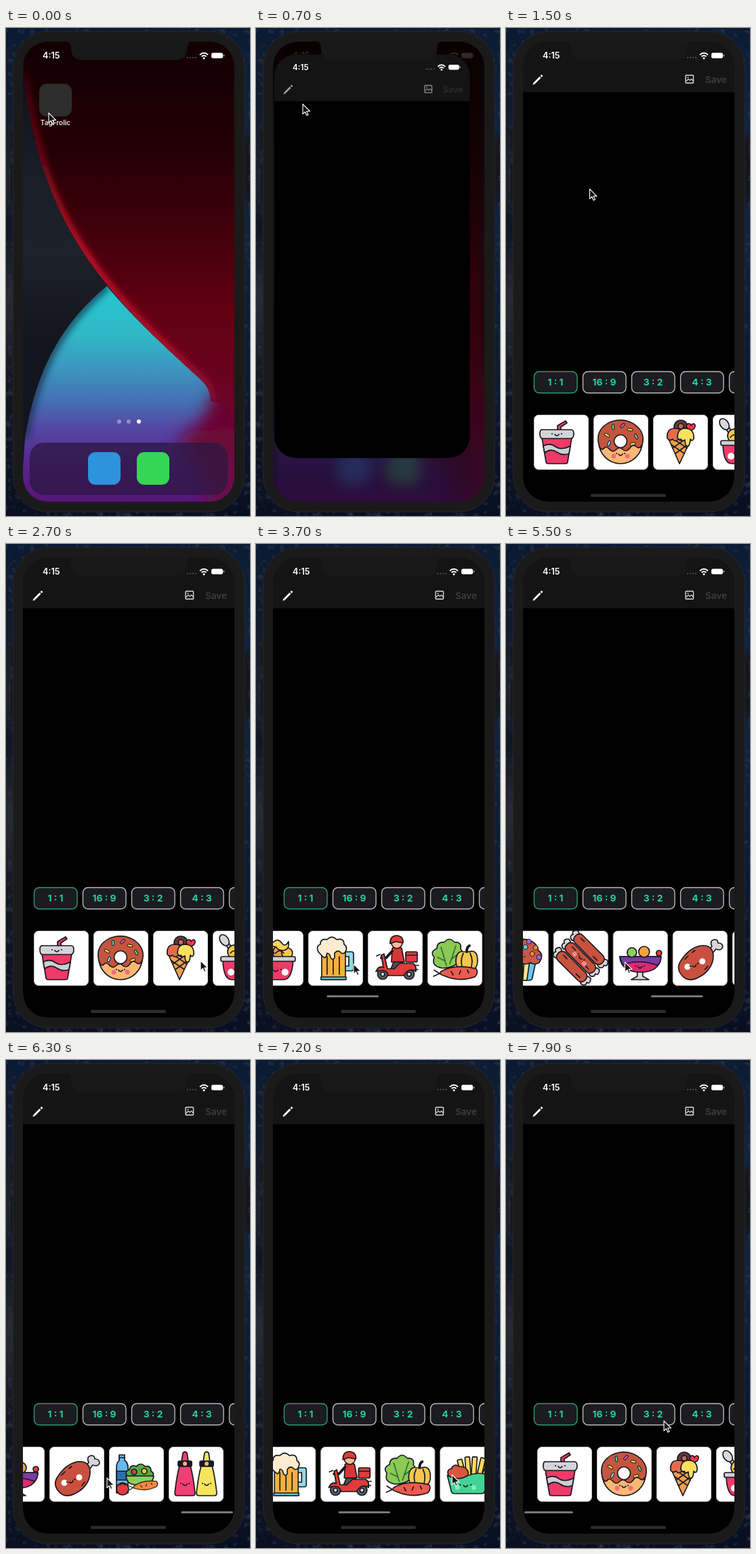
An HTML page that plays this animation: 360x718 px, repeating every 8 s.

```html
<!DOCTYPE html>
<html lang="en">
<head>
<meta charset="utf-8">
<title>Sticker picker</title>
<style>
html, body { margin: 0; width: 100%; height: 100%; overflow: hidden; background: #081226; }
svg { display: block; width: 360px; height: 718px; }
text { font-family: Inter, Roboto, sans-serif; font-weight: 600; }
.art { stroke: #191820; stroke-width: 1.7; stroke-linejoin: round; stroke-linecap: round; }
</style>
</head>
<body>
<svg id="stage" viewBox="0 0 360 718"></svg>
<script>
const LOOP = 8000, PITCH = 88, MAX_SCROLL = 945;
const path = (d, fill = 'none', more = '') => `<path d="${d}" fill="${fill}" ${more}/>`;
const disc = (x, y, r, fill, more = '') => `<circle cx="${x}" cy="${y}" r="${r}" fill="${fill}" ${more}/>`;
const box = (x, y, w, h, r, fill, more = '') =>
  `<rect x="${x}" y="${y}" width="${w}" height="${h}" rx="${r}" fill="${fill}" ${more}/>`;
const text = (x, y, size, fill, str, more = '') =>
  `<text x="${x}" y="${y}" font-size="${size}" fill="${fill}" ${more}>${str}</text>`;
const line = (d, color, width) => path(d, 'none', `stroke="${color}" style="stroke-width:${width}"`);
const flat = 'stroke="none" style="stroke:none"';
const turn = (angle, x, y, inner) => `<g transform="rotate(${angle} ${x} ${y})">${inner}</g>`;
const ramp = (id, stops) =>
  `<linearGradient id="${id}" gradientUnits="userSpaceOnUse" x1="0" y1="0" x2="0" y2="718">` +
  stops.map(([y, c]) => `<stop offset="${y / 718}" stop-color="${c}"/>`).join('') + '</linearGradient>';

const face = (x, y, gap = 7, cheek = 'none') =>
  disc(x - gap - 4, y + 4, 3.4, cheek, flat) + disc(x + gap + 4, y + 4, 3.4, cheek, flat) +
  disc(x - gap, y, 1.1, '#191820', flat) + disc(x + gap, y, 1.1, '#191820', flat) +
  path(`M${x - 3} ${y + 1}q3 4 6 0`);
const beads = (spots, r) => {
  const colors = ['#f9dc4a', '#ee5aa0', '#64c7e8', '#a06be0', '#f58a3c'];
  return spots.map(([x, y], i) => disc(x, y, r, colors[i % 5], 'style="stroke-width:1"')).join('');
};
const carrot = (color) =>
  path('M72 56Q40 48 20 60Q16 64 24 66Q46 76 70 68Q76 62 72 56Z', color) +
  path('M18 63l-8-5m8 5l-9 4m26-7l3 5m11-6l-2 5m12-6l2 4');
const bottle = (x, color) =>
  path(`M${x + 10} 22L${x + 12} 9q3-3 6 0L${x + 20} 22Z`, color) +
  path(`M${x + 7} 28Q${x + 3} 42 ${x} 68q0 4 4 4h22q4 0 4-4Q${x + 27} 42 ${x + 23} 28Z`, color) +
  box(x + 5, 21, 20, 8, 2, '#191820') + disc(x + 15, 25, 3, '#f2b48a', flat) + face(x + 15, 54, 6);
const rib = (y) =>
  path(`M15 ${y - 5}q-7-5-9 0-3 5 2 6-3 4 2 7 4 1 6-2Zm50 0q7-5 9 0 3 5-2 6 3 4-2 7-4 1-6-2Z`, '#d9d6d6') +
  box(12, y - 8, 56, 16, 7, '#c9523f') + path(`M20 ${y - 3}h7m25 6h8`);

const stickers = [
  // soda
  path('M35 23V16L47 9l2 3-9 6v5Z', '#ee3a68') +
  path('M12 34L18 69q0 3 4 3h24q4 0 4-3L56 34Z', '#ee3a68') +
  path('M14 46q10-5 18 1t22-1l-2 11q-9 4-18-2t-18 1Z', '#cbd0d4') +
  path('M13 22h42q4 0 4 6t-4 7H13q-4 0-4-7t4-6Z', '#d2d4d7') + face(34, 28),
  // donut
  disc(40, 40, 32, '#fbb873') +
  path('M8 44C2 20 22 8 40 8s38 14 32 36q-4 8-10 2-5-3-9 4-5 6-11 0-4-3-8 1-6 6-11-1-5-5-8 0-5 3-7-6Z', '#c4553f') +
  disc(40, 39, 9.5, '#fff') +
  [[20, 30, '#f9dc4a'], [29, 18, '#63cf93'], [43, 16, '#ee5aa0'], [54, 22, '#f9dc4a'], [63, 32, '#63cf93'], [23, 42, '#8fd5f4'], [58, 43, '#f9dc4a']]
    .map(([x, y, c], i) => turn(i * 53 + 30, x, y, box(x - 4, y - 1.7, 8, 3.4, 1.7, c, 'style="stroke-width:1"'))).join('') +
  face(40, 57, 6, '#f56b79'),
  // ice cream
  disc(41, 18, 10, '#633b3a') + disc(41, 17, 4, '#c46a58') +
  path('M54 24q-9-8-2-11 4 0 4 3 3-5 6-1 1 6-8 9Z', '#ef3b4d') +
  path('M23 36L39 72 56 36Z', '#f0a050') + path('M27 44l19 13M32 37l18 12M51 44L33 57M46 37L29 49') +
  path('M21 35q-2-15 12-15 13 1 12 15-4 5-8 1-4 5-8 0-4 3-8-1Z', '#e56c4a') +
  path('M36 33q0-13 12-13 13 1 12 15-2 5-5 1-1 12-5 10-3-1-3-9-4 3-6-1-3 2-5-3Z', '#fbe05c'),
  // noodle bowl
  turn(-35, 20, 18, path('M18 20h5l1 22h-7Z', '#c5cacf') + '<ellipse cx="20" cy="13" rx="6" ry="9" fill="#d7dadd"/>') +
  disc(32, 31, 10, '#f9c74f') + disc(46, 32, 10, '#f09a4c') + disc(57, 33, 8, '#f9c74f') +
  path('M32 22q10-14 17-4 5 7 10-2 2 12-8 13-8 0-10-5Z', '#fbd45c') + path('M40 33q6-7 12 0M26 33q6-7 12 0') +
  path('M15 44Q16 72 28 72H52Q64 72 66 44Z', '#ee3a68') + box(12, 38, 57, 7, 2, '#cbd0d4') +
  disc(27, 61, 5, '#fff', flat) + disc(54, 61, 5, '#fff', flat) + face(40, 57, 8),
  // mug
  path('M54 31h10q3 0 3 3v21q0 4-3 4H54v-7h6V38h-6Z', '#8fdce8') +
  box(20, 26, 35, 46, 3, '#f6b040') + path('M28 38v26m9-26v26m9-26v26') +
  path('M19 68h37v4H19Z', '#5cc8c4') +
  path('M15 31q-4-8 3-11 0-9 10-7 7-7 14 0 11-3 11 7 6 4 2 11-4 5-8 0-4-3-8 2v7q-4 4-6-1-1-6-5-6-2 10-6 5-3-2-7-7Z', '#fbecd0'),
  // delivery scooter
  disc(22, 64, 7.5, '#5b5f68') + disc(61, 64, 7.5, '#5b5f68') + disc(22, 64, 3, '#d7dadd') + disc(61, 64, 3, '#d7dadd') +
  box(56, 31, 17, 15, 2, '#e23b3b') + path('M56 36h17') +
  path('M36 26q8-5 14 0l4 20H35Z', '#d83636') + path('M36 30l-9 10h-7', 'none', 'style="stroke-width:4"') +
  path('M38 46h14l-3 8-12 9h-7l5-9Z', '#4b4f59') +
  path('M12 60q4-9 11-6l-3-18 4-2 5 22h10l8-8h20q5 4 4 12-10-7-18 6H30q-1-11-18-6Z', '#e23b3b') +
  disc(43, 18, 8, '#f4bd94') + path('M33 18q0-11 10-11 10 1 9 11l-11-2-8 3Z', '#e23b3b') +
  path('M70 51h5m-5 6h4M18 35l-5 2'),
  // vegetables
  path('M22 55q-17-3-12-16-7-8 4-13 0-10 11-9 7-9 15 0 11-1 9 10 7 7-1 14-3 13-26 14Z', '#8cc955') +
  path('M20 24l8 27m14-29l-9 27M15 39l10 5m18-8l-8 6', 'none', 'stroke="#2b722f"') +
  path('M58 31q0-7 4-9', 'none', 'style="stroke-width:4"') +
  path('M58 32q16-7 16 12 0 16-16 14-16 2-16-14 1-18 16-12Z', '#f4c64a') + path('M53 33q-6 12 0 25m10-25q6 12 0 25') +
  carrot('#ec5a50'),
  // fries
  [[36, 18, -14], [43, 15, -4], [50, 15, 4], [58, 16, 13], [65, 22, 22]]
    .map(([x, y, a]) => turn(a, x, 45, box(x - 4, y, 7, 32, 1, '#fbd95c'))).join('') +
  path('M13 43q-4-9 4-11 4-8 12-3 11 0 13 9l-2 11H18Z', '#d9573f') +
  path('M11 42Q26 51 40 43 57 36 71 42L66 66q-1 3-5 3H22q-4 0-5-3Z', '#43d394') + face(38, 56, 8, '#8be8bd'),
  // muffin
  path('M19 46L25 70q1 3 4 3h23q4 0 5-3L62 46Z', '#6bc8ec') +
  path('M28 46l4 27h6l-2-27Zm17 0l-2 27h6l4-27Z', '#fbe58a') +
  path('M14 47q-8-11 1-18 3-17 25-17 23 1 26 17 9 7 1 18-7 4-13 0-7 4-14 0-7 4-14 0-6 4-12 0Z', '#c9594a') +
  beads([[19, 24], [29, 16], [40, 14], [52, 16], [62, 25], [14, 38], [33, 25], [47, 24], [67, 39], [57, 34], [23, 34]], 3.6) + face(40, 38, 6),
  // ribs
  turn(45, 40, 40, rib(22) + rib(40) + rib(58) + face(40, 38, 6, '#f28b85')),
  // fruit bowl
  path('M36 57h8v10l9 5H27l9-5Z', '#d7dadd') + path('M58 52L67 35', 'none', 'style="stroke-width:3"') +
  path('M10 38h61q-2 23-30 23-29 0-31-23Z', '#d92b73') + path('M10 38h61q0 9-5 13Q40 41 14 50Z', '#7a3ca4') +
  disc(68, 33, 4, '#e23b3b') + disc(28, 32, 7, '#8bcf5a') + disc(46, 31, 8, '#f7a43d') + face(40, 52, 6),
  // drumstick
  path('M50 33l8-10q-4-9 4-10 5 0 5 5 7 0 7 6-2 6-10 3L56 37Z', '#d5d7da') +
  path('M14 66Q4 55 13 43 24 26 41 22 58 20 60 35 61 52 46 64 25 79 14 66Z', '#c9503e') +
  path('M18 42l5-5m6-5l4-3m15 28l4-5') + disc(22, 53, 4.5, '#fff', flat) + disc(44, 45, 4.5, '#fff', flat) +
  turn(-20, 32, 51, face(32, 50, 6)),
  // groceries
  path('M15 12h8v8q5 4 5 10v38H11V30q0-6 4-10Z', '#66b9ea') + path('M11 36h17v13H11Z', '#2e6fa8') + path('M15 16h8') +
  path('M27 43q-5-7 3-9 2-9 10-5 7-7 13 0 9-2 9 7 6 3 2 8Z', '#55ad48') + disc(37, 37, 4, '#e23b3b') + disc(52, 36, 4, '#f7c53d') +
  path('M25 43h41q-2 13-14 13H38q-12-1-13-13Z', '#8bcf5a') +
  turn(-8, 48, 62, `<g transform="translate(24 17) scale(.66)">${carrot('#f58a3c')}</g>`) +
  disc(20, 62, 9, '#e23b3b') + path('M20 53l-4 3m4-3l4 3'),
  // sauces
  bottle(9, '#ef3f73') + bottle(41, '#f6e45c')
];

const status = `<g>${text(54, 45, 12.7, '#fff', '4:15')}` +
  [268, 272, 276, 280].map(x => disc(x, 43.5, 1.1, '#555')).join('') +
  line('M286 39.500q6-5.500 12 0', '#fff', 2) + line('M288.500 42q3.500-3 7 0', '#fff', 2) + disc(292, 44.5, 1.5, '#fff') +
  box(303, 36.5, 17, 8, 2.5, '#fff') + box(320.7, 39, 1.5, 3, .7, '#aaa') + '</g>';

const edge = 'M26 68C43 215 87 302 151 380C193 432 236 470 287 517Q302 530 302 549';
const rim = 'M149 380C85 432 45 500 28 604';
const home = box(0, 0, 360, 718, 0, 'url(#slate)') +
  `<g clip-path="url(#wedgeArea)">${box(0, 370, 360, 348, 0, 'url(#wedge)')}
  ${path(rim, 'none', 'stroke="#14304e" stroke-width="12" opacity=".75" filter="url(#soft)"')}
  ${path('M303 540Q298 580 250 606Q292 640 305 730H370V500Z', 'url(#red)', 'filter="url(#haze)"')}</g>` +
  path(edge + 'L338 560V0H26Z', 'url(#red)') +
  `<g clip-path="url(#redArea)">${path(edge, 'none', 'stroke="url(#glow)" stroke-width="16" filter="url(#soft)"')}</g>` +
  `<g id="icons">${box(49, 82, 48, 48, 11, '#2c2d2c')}
  ${text(73, 143, 10, '#e8e4e6', 'TagFrolic', 'text-anchor="middle"')}
  ${[167, 181, 196].map((x, i) => disc(x, 579, 3, i < 2 ? '#a08fc0' : '#fff')).join('')}
  ${box(35, 610, 292, 77, 21, '#2a1740', 'opacity=".72"')}
  ${box(121, 624, 48, 48, 11, '#2c93dc')}${box(193, 624, 48, 48, 11, '#35d653')}</g>`;

const ratios = ['1 : 1', '16 : 9', '3 : 2', '4 : 3', '5 : 4'].map((label, i) =>
  box(41.5 + 72 * i, 505.5, 63.5, 31.5, 7.5, '#1b1b20', `stroke="${i ? '#b9b9bb' : '#2a9b78'}" stroke-width="1.400"`) +
  text(73 + 72 * i, 526, 13.8, '#22d3a0', label, 'text-anchor="middle" style="font-weight:700"')).join('');

const app = box(0, 0, 360, 718, 0, '#000') + box(0, 0, 360, 94.5, 0, '#141414') + status +
  `<g id="tools">${line('M42 81L50.500 72.500', '#fff', 2.8)}${line('M51.500 71.500L53.500 69.500', '#fff', 2.8)}${path('M39.500 83.500l1-3.500 2.500 2.500Z', '#fff')}
  ${box(265, 69.5, 11.5, 11.5, 1, 'none', 'stroke="#ddd" stroke-width="1.400"')}
  ${line('M266 78l3-3 2.500 2 2-2 3 3', '#ddd', 1.2)}${disc(268.5, 72.7, .9, '#ddd')}
  ${text(294, 80.5, 13.5, '#3d3d3f', 'Save')}</g>
  <g id="controls">${ratios}<g id="strip">` +
  stickers.map((art, i) => `<g transform="translate(${41 + PITCH * i} 569)">
    ${box(.5, .5, 80, 80, 6.5, '#fff', 'stroke="#c4c4c4" stroke-width="1"')}<g class="art">${art}</g></g>`).join('') +
  `</g><rect id="bar" y="664" height="3" rx="1.5" fill="#777"/>${box(125, 685.5, 111, 4.5, 2.2, '#2d2d2e')}</g>`;

const stage = document.getElementById('stage');
const blur = (id, size) => `<filter id="${id}" filterUnits="userSpaceOnUse" x="-40" y="-40" width="440" height="800"><feGaussianBlur stdDeviation="${size}"/></filter>`;
stage.innerHTML = `<defs>
${ramp('left', [[0, '#0a1a33'], [130, '#141b2b'], [230, '#20232d'], [290, '#101622'], [400, '#282a33'], [520, '#13161f'], [640, '#0d1220'], [718, '#0a1022']])}
${ramp('right', [[0, '#0c1b33'], [150, '#0f2341'], [170, '#17161d'], [240, '#15171f'], [270, '#10223d'], [520, '#0c1a33'], [718, '#090f22']])}
${ramp('slate', [[60, '#0d0f14'], [200, '#191d26'], [330, '#1d212a'], [450, '#14161e'], [718, '#141020']])}
${ramp('wedge', [[380, '#25c8d0'], [450, '#2fb8c6'], [500, '#3c97c0'], [545, '#4274b4'], [590, '#5546a4'], [640, '#56268c'], [700, '#581474']])}
${ramp('red', [[20, '#120003'], [180, '#230005'], [290, '#3f000a'], [420, '#620012'], [520, '#68031f'], [600, '#6c0738'], [697, '#680a4c']])}
${ramp('glow', [[68, '#30000a'], [180, '#6a0512'], [330, '#b81026'], [460, '#a80d25'], [530, '#860f32'], [570, '#6c0a3a']])}
${blur('soft', 5)}${blur('haze', 12)}
<filter id="rock" x="0" y="0" width="1" height="1"><feTurbulence baseFrequency=".09" numOctaves="3" seed="4"/>
<feColorMatrix values="0 0 0 0 .02  0 0 0 0 .03  0 0 0 0 .06  2.6 0 0 0 -.9"/></filter>
<clipPath id="redArea">${path(edge + 'L338 560V0H26Z')}</clipPath>
<clipPath id="wedgeArea">${path(rim + 'L20 718H360V500L302 549Q302 530 287 517C236 470 193 432 149 380Z')}</clipPath>
<clipPath id="screen">${box(25, 20, 312, 677, 37, '#000')}</clipPath>
<clipPath id="window"><rect id="pane"/></clipPath>
</defs>
${box(0, 0, 180, 718, 0, 'url(#left)')}${box(180, 0, 180, 718, 0, 'url(#right)')}
${box(0, 0, 360, 718, 0, '#000', 'filter="url(#rock)"')}
${box(7, 151, 6, 28, 1, '#17181b')}${box(7, 200, 6, 54, 1, '#17181b')}${box(349, 179, 6, 66, 1, '#17181b')}
${box(10.5, 5, 341.5, 707, 52, '#1a1a1a', 'stroke="#26272a" stroke-width="1"')}
<g clip-path="url(#screen)">
<g id="home">${home}</g>
<g id="clock">${status}</g>
<g id="shell" clip-path="url(#window)"><g id="app">${app}</g></g>
</g>
<path d="M87 19q9 1 9 11 0 17 17 17H250q17 0 17-17 0-10 9-11Z" fill="#181818"/>
<path id="cursor" d="M0 0V14.500L3.400 11.400 5.700 16.600 8 15.600 5.700 10.500H10.500Z" fill="#111" stroke="#f2f2f2" stroke-width="1.200" stroke-linejoin="round"/>`;

const $ = id => document.getElementById(id);
const set = (id, attrs) => { for (const k in attrs) $(id).setAttribute(k, attrs[k]); };

// Keys are [time, value...]; the curve eases between neighbours.
const track = (keys, t, ease = u => u * u * (3 - 2 * u)) => {
  let i = 0;
  while (i < keys.length - 2 && t >= keys[i + 1][0]) i++;
  const [a, b] = [keys[i], keys[i + 1]];
  const u = ease(Math.min(1, Math.max(0, (t - a[0]) / (b[0] - a[0]))));
  return a.slice(1).map((v, j) => v + (b[j + 1] - v) * u);
};
const pointer = [[0, 63, 125], [300, 63, 125], [700, 69, 112], [1200, 90, 160], [2350, 287, 613], [2800, 287, 613],
  [3200, 144, 618], [3800, 144, 618], [4150, 280, 617], [4250, 280, 617], [4600, 154, 617], [4800, 154, 617],
  [5150, 285, 616], [5250, 285, 616], [5600, 149, 615], [6400, 149, 615], [6700, 290, 614], [6950, 150, 614],
  [7250, 300, 610], [7400, 300, 610], [7900, 233, 531]];
const scroll = [[2800, 0], [3000, 70], [3200, 150], [3400, 235], [3700, 316], [4000, 345], [4250, 352],
  [4420, 415], [4600, 499], [4700, 548], [4950, 625], [5250, 660], [5420, 725], [5600, 810], [5800, 905],
  [5950, 951], [6200, 945], [6420, 945], [6560, 880], [6700, 790], [6950, 580], [7100, 480], [7250, 340],
  [7450, 110], [7600, -12], [7700, -24], [7900, -5], [8000, -1]];

function draw(t) {
  const since = Math.max(0, t - 400);
  const open = since > 700 ? 1 : 1 - Math.exp(-.008 * since);
  const mix = (a, b, u) => a + (b - a) * u;
  const w = mix(48, 312, open), h = mix(48, 677, open ** 1.5);
  const x = mix(73, 181, open) - w / 2, y = mix(106, 358.5, open) - h / 2, k = w / 312;
  set('pane', { x, y, width: w, height: h, rx: mix(11, 37, open) * k });
  set('app', { transform: `translate(${x} ${y}) scale(${k}) translate(-25 -20)` });
  set('shell', { opacity: Math.min(1, since / 130) });
  set('tools', { opacity: Math.min(1, since / 500) });
  set('controls', { visibility: t < 1000 ? 'hidden' : 'visible' });
  set('clock', { opacity: 1 - .93 * open });
  set('icons', { opacity: 1 - .65 * open });
  $('home').style.filter = since ? `blur(${11 * open}px) brightness(${1 - .5 * open})` : 'none';
  $('home').style.display = open === 1 ? 'none' : '';

  const s = track(scroll, t, u => u)[0];
  const over = Math.max(0, -s, s - MAX_SCROLL);
  const barWidth = Math.max(20, 76.5 - over * .9);
  const inside = Math.min(MAX_SCROLL, Math.max(0, s));
  set('strip', { transform: `translate(${-s} 0)` });
  set('bar', { x: 27 + inside / MAX_SCROLL * (308 - barWidth), width: barWidth, opacity: t < 2800 ? 0 : Math.min(1, (t - 2800) / 100) });
  set('cursor', { transform: `translate(${track(pointer, t)})` });
}

const start = performance.now();
(function tick() {
  draw((performance.now() - start) % LOOP);
  requestAnimationFrame(tick);
})();
</script>
</body>
</html>
```
